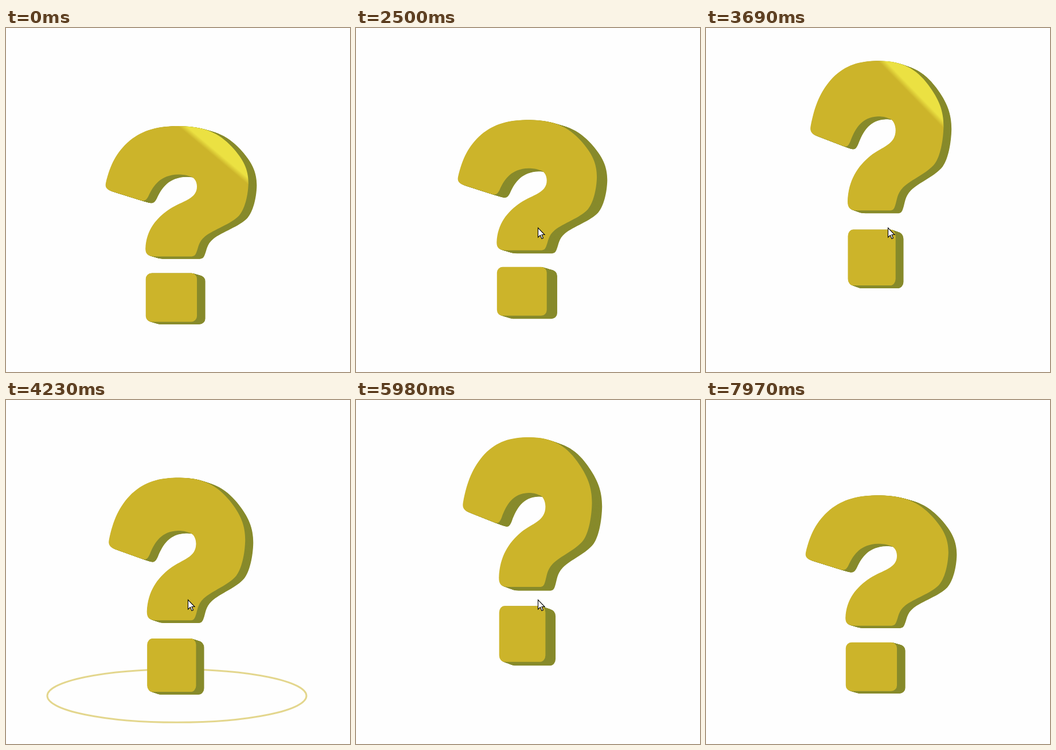
Recreate the animation shown at these times as an HTML page with a canvas. Size 600 px wide and 600 px high, loop 8 s.

```html
<!DOCTYPE html>
<html lang="en">
<head>
<meta charset="utf-8">
<title>Question mark</title>
<style>
  html, body { margin: 0; height: 100%; overflow: hidden; background: #fefefe; }
  canvas { display: block; width: 100vw; height: 100vh; }
</style>
</head>
<body>
<canvas width="600" height="600"></canvas>
<script>
const ctx = document.querySelector('canvas').getContext('2d');
const LOOP = 8000;
const FACE = '#ccb42a', SHINE = '#ebe142', SIDE = '#878a2b';
const CENTER = 298, FLOOR = 512;
const CLICKS = [3332, 5630];
const JUMP = 1525;

const mark = new Path2D(`M174.5 270 C182 238 193 216 216 196 C240 177 264 170.5 303 170.5
  C345 171 371 182 394 207 C414 229 422.5 246 422.5 270 C422 292 416 316 406 327
  C393 341 362 351 347 363 C335 373 336 382 332 391 C330 396 328 398 322 398
  L262 398 C248 398 243.5 394 243.5 384 C245 352 262 331 286 315
  C308 301 333 298 333 276 C333 267 328 259 320 258 C312 255 305 255 300 255
  C270 256 258 273 249 292 C245 300 242 302 235 300 L184 284 C176 281 173 277 174.5 270Z`);
mark.roundRect(244, 427, 89, 85, 10);

const arrow = new Path2D('M0 0 V16.5 L4 13 L6.5 19 L9 18 L6.5 12 H11.5 Z');

const clamp = (v, lo, hi) => Math.min(hi, Math.max(lo, v));
const wave = (t, peak) => Math.cos(2 * Math.PI * (t - peak) / 4100);

// Smooth interpolation through [time, value] pairs.
function track(keys, t) {
  if (t <= keys[0][0]) return keys[0][1];
  for (let i = 1; i < keys.length; i++) {
    const [t0, a] = keys[i - 1], [t1, b] = keys[i];
    if (t < t1) {
      const u = (t - t0) / (t1 - t0);
      return a + (b - a) * u * u * (3 - 2 * u);
    }
  }
  return keys[keys.length - 1][1];
}

const LIFT = [[190, 0], [535, 124], [650, 0]];
const STRETCH = [[0, 1], [100, .84], [200, 1.1], [360, 1.147], [535, 1.04], [640, 1.12],
  [740, .7], [870, 1.12], [980, .97], [1050, 1]];

function drawRing(phase) {
  const u = (phase - 610) / 766;
  if (u <= 0 || u >= .8) return;
  const rx = 298 * (1 - (1 - u) ** 3);
  ctx.globalAlpha = 1 - u / .8;
  ctx.strokeStyle = FACE;
  ctx.lineWidth = 3;
  ctx.beginPath();
  ctx.ellipse(CENTER, 516, rx, rx * .205, 0, 0, 2 * Math.PI);
  ctx.stroke();
  ctx.globalAlpha = 1;
}

// Diagonal light band travelling from lower left to upper right.
function facePaint(t) {
  const low = 67 + .448 * ((t + 1000) % 3690 - 1000);
  const nx = .643, ny = -.766, from = low - 5, span = 72;
  const g = ctx.createLinearGradient(nx * from, ny * from, nx * (from + span), ny * (from + span));
  const soft = 9 / span;
  g.addColorStop(0, FACE);
  g.addColorStop(soft, SHINE);
  g.addColorStop(1 - soft, SHINE);
  g.addColorStop(1, FACE);
  return g;
}

function drawMark(t, phase) {
  const paused = CLICKS.reduce((sum, c) => sum + clamp(t - c, 0, JUMP), 0);
  const bob = -5.7 - 6.2 * wave(t - paused, 2000);
  const depth = 17 - 2.5 * wave(t, -100);
  const sy = track(STRETCH, phase);
  const sx = (1 - (depth - 15) * .0065) / Math.sqrt(sy);

  ctx.save();
  ctx.translate(CENTER + (depth - 15) * .15, FLOOR + bob - track(LIFT, phase));
  ctx.scale(sx, sy);
  ctx.translate(-CENTER, -FLOOR);
  ctx.fillStyle = SIDE;
  const layers = 24;
  for (let i = layers; i > 0; i--) {
    const d = depth * i / layers;
    ctx.save();
    ctx.translate(d, d * .29);
    ctx.fill(mark);
    ctx.restore();
  }
  ctx.fillStyle = facePaint(t);
  ctx.fill(mark);
  ctx.restore();
}

function drawCursor(t) {
  const away = track([[1450, 1], [2200, 0], [7050, 0], [7420, 1]], t);
  if (away === 1) return;
  const bend = 2 * away * (1 - away), end = away * away, start = (1 - away) ** 2;
  ctx.save();
  ctx.translate(317.5 * start + 450 * bend + 602 * end, 348.5 * start + 490 * bend + 529 * end);
  ctx.fillStyle = '#fff';
  ctx.strokeStyle = '#000';
  ctx.lineWidth = 1.1;
  ctx.fill(arrow);
  ctx.stroke(arrow);
  ctx.restore();
}

function frame() {
  const t = performance.now() % LOOP;
  const click = CLICKS.filter(c => c <= t).pop();
  const phase = click === undefined ? 0 : t - click;
  ctx.fillStyle = '#fefefe';
  ctx.fillRect(0, 0, 600, 600);
  drawRing(phase);
  drawMark(t, phase);
  drawCursor(t);
  requestAnimationFrame(frame);
}
frame();
</script>
</body>
</html>
```
